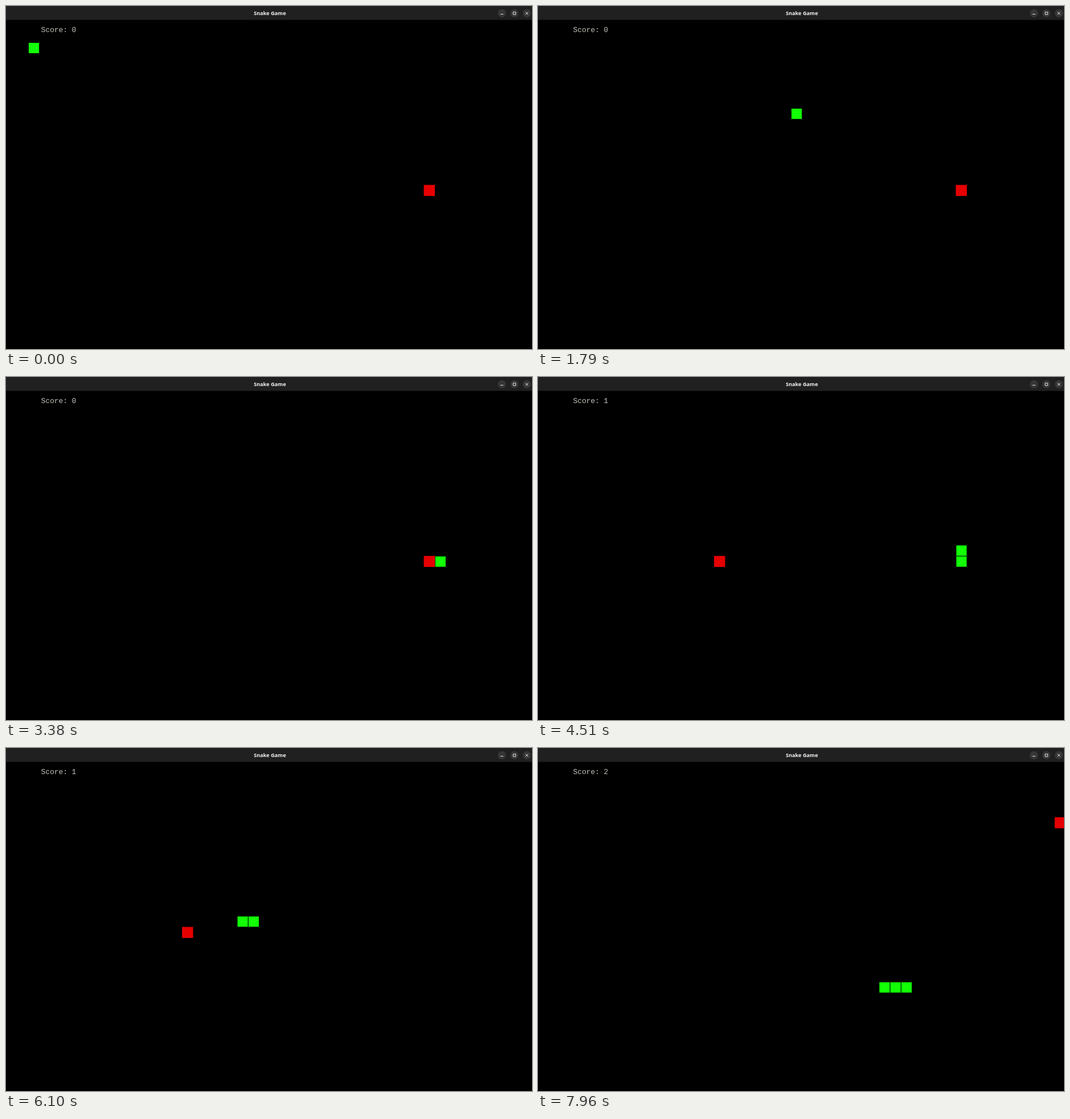
These frames come from a looping animation (926x605 px, 8000 ms). An HTML page with a canvas:

```html
<!DOCTYPE html>
<html lang="en">
<head>
<meta charset="utf-8">
<title>Snake Game</title>
<style>
  html, body { margin: 0; width: 926px; height: 605px; overflow: hidden; background: #000; }
  canvas { display: block; }
</style>
</head>
<body>
<canvas id="stage" width="926" height="605"></canvas>
<script>
const ctx = document.getElementById('stage').getContext('2d');
const LOOP = 8000, TICK = 66.3, PITCH = 19.345;
const STALLS = [62, 119];              // ticks that repeat the picture before them
const EATEN = [67, 97];                // steps on which food is eaten
const FOOD = [[36, 13], [14, 13], [45, 3]];
const DIRS = { R: [1, 0], L: [-1, 0], U: [0, -1], D: [0, 1] };

const path = [[0, 0]];
for (const run of 'R10 D6 R27 D8 L2 U7 R1 D9 L8 U4 L14 D6 R17'.split(' ')) {
  const [dx, dy] = DIRS[run[0]];
  for (let n = +run.slice(1); n > 0; n--) {
    const [x, y] = path[path.length - 1];
    path.push([x + dx, y + dy]);
  }
}

function stepAt(ms) {
  let tick = Math.floor((ms + 5) / TICK);
  if (STALLS.includes(tick)) tick--;
  return tick < 43 ? tick : tick - 1;  // the game pauses for one tick
}

function cell([col, row], color, grow) {
  ctx.fillStyle = color;
  ctx.fillRect(40 + col * PITCH - grow, 65 + row * PITCH - grow, 18.2 + grow * 1.4, 18.2 + grow * 1.4);
}

function text(str, x, y, font, color, align) {
  ctx.font = font;
  ctx.fillStyle = color;
  ctx.textAlign = align;
  ctx.fillText(str, x, y);
}

function titleBar() {
  ctx.fillStyle = '#202020';
  ctx.fillRect(0, 0, 926, 24.5);
  text('Snake Game', 464.5, 16, 'bold 9.2px "Open Sans", "Noto Sans", sans-serif', '#f4f4f4', 'center');
  ctx.fillStyle = '#363636';
  for (const x of [873, 895, 917]) {
    ctx.beginPath();
    ctx.arc(x, 12.8, 7.2, 0, 7);
    ctx.fill();
  }
  ctx.strokeStyle = '#eee';
  ctx.lineWidth = 1;
  ctx.beginPath();
  ctx.moveTo(870.5, 14.5); ctx.lineTo(875.5, 14.5);
  ctx.rect(892.9, 10.7, 4.4, 4.4);
  ctx.moveTo(914.5, 10.5); ctx.lineTo(919.2, 15.2);
  ctx.moveTo(919.2, 10.5); ctx.lineTo(914.5, 15.2);
  ctx.stroke();
}

function draw(now) {
  const step = stepAt(now % LOOP);
  const score = EATEN.filter(s => step >= s).length;
  ctx.fillStyle = '#000';
  ctx.fillRect(0, 0, 926, 605);
  titleBar();
  text('Score: ' + score, 61.7, 46, '12.9px "Liberation Mono", monospace', '#c4c4bc', 'left');
  cell(FOOD[score], '#e60000', 0.9);
  for (const part of path.slice(Math.max(0, step - score), step + 1)) cell(part, '#12ff06', 0);
}

const start = performance.now();
function frame() {
  draw(performance.now() - start);
  requestAnimationFrame(frame);
}
frame();
</script>
</body>
</html>
```
